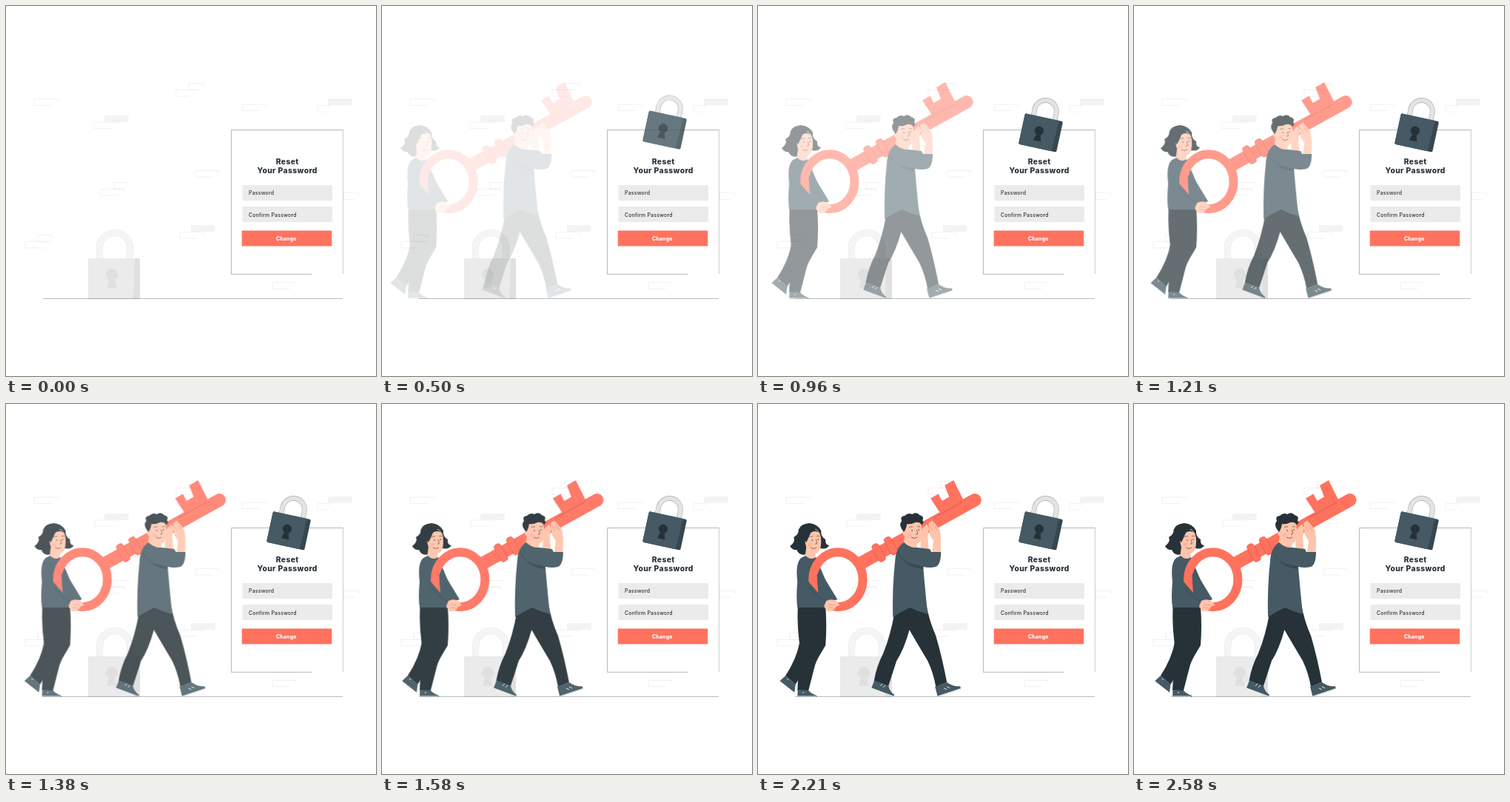
An HTML page for the animation above (2620 ms loop, 500 px wide and 500 px high).

```html
<!DOCTYPE html>
<html lang="en">
<head>
<meta charset="utf-8">
<title>Reset your password</title>
<style>
  html, body { margin: 0; width: 100%; height: 100%; overflow: hidden; background: #fff; }
  svg { display: block; width: 100vw; height: 100vh; }
  text { font-family: Inter, Roboto, sans-serif; fill: #263238; }
  .title { font-size: 10.3px; font-weight: 800; letter-spacing: .4px; text-anchor: middle; }
  .label { font-size: 6.9px; font-weight: 500; letter-spacing: .25px; }
  .button { font-size: 6.9px; font-weight: 800; letter-spacing: .2px; text-anchor: middle; fill: #fff; }
  .line { fill: none; stroke: #263238; stroke-width: .6; }
  .thin { fill: none; stroke: #263238; stroke-width: .35; }
  .white { fill: none; stroke: #fff; stroke-width: .9; }
  .skin { fill: #ffc4ab; }
  .dark { fill: #263238; }
  .cloth { fill: #455a64; }
  .shade { fill: #37474f; }
  .coral { fill: #ff725e; }
  .pale { fill: #ebebeb; }
  .grey { fill: #e0e0e0; }
</style>
</head>
<body>
<svg viewBox="0 0 500 500">
  <g id="bricks" fill="none" stroke="#e0e0e0" stroke-width=".45"></g>

  <g id="floorLock" fill="none">
    <path d="M126.5 342V327a20.5 20.5 0 0 1 41 0v15" stroke="#e6e6e6" stroke-width="9"/>
    <path d="M126.5 342V327a20.5 20.5 0 0 1 41 0v15" stroke="#f5f5f5" stroke-width="8"/>
    <rect class="grey" x="111" y="341" width="70" height="55" rx="2"/>
    <path class="pale" d="M113 341H174L172 396H113q-2 0-2-2V343q0-2 2-2z"/>
    <circle class="grey" cx="143" cy="363" r="8"/>
    <path class="grey" d="M140 368h6l4 13h-14z"/>
  </g>
  <path class="thin" d="M50 395.4H455"/>

  <g id="form">
    <path fill="#fff" d="M304.5 167.5h151v195h-151z"/>
    <path class="thin" d="M413 362.4H304.5V167.5h151"/>
    <path class="thin" d="M455.5 167.5V362" opacity=".7"/>
    <text class="title" x="380.2" y="214.2">Reset</text>
    <text class="title" x="380.2" y="226.2">Your Password</text>
    <path class="pale" d="M319.5 242H441v21H319.5zM319.5 271H441v21H319.5z"/>
    <rect class="coral" x="318.7" y="303.5" width="121.6" height="21" rx=".5"/>
    <text class="label" x="328" y="254.5">Password</text>
    <text class="label" x="328" y="284.5">Confirm Password</text>
    <text class="button" x="378.800" y="316.500">Change</text>
  </g>

  <g id="lock">
    <g transform="translate(361 145) rotate(12.2)">
      <path d="M11.500 2V-8.500a14.800 14.800 0 0 1 29.600 0V2" fill="none" stroke="#8b9499" stroke-width="6.600"/>
      <path d="M11.500 2V-8.500a14.800 14.800 0 0 1 29.600 0V2" fill="none" stroke="#e3e3e3" stroke-width="5.800"/>
      <rect class="shade" width="52.300" height="42.500" rx="2"/>
      <path class="cloth" d="M2 0H47L45.500 42.500H2q-2 0-2-2V2q0-2 2-2z"/>
      <circle class="dark" cx="23.500" cy="19.200" r="6.200"/>
      <path class="dark" d="M21 23h5l3 10H18.500z"/>
    </g>
  </g>

  <g id="people">
    <g id="woman">
      <path class="dark" d="M68 161Q56 162 53.500 170Q54 176 47 180Q50 186 42 192Q45 198 51 197Q55 206 64 203
        L84 195Q91 197 95 191Q89 190 90 183Q83 179 84 171Q79 162 68 161z"/>
      <path class="dark" d="M55 322Q51 344 36 367L49.500 379Q59 364 66 342z"/>
      <path class="dark" d="M52.500 272L90 274Q92 300 90 326C84 337 78 345 75.500 354L67 387H52Q53 360 57 338Q51 305 52.500 272z"/>
      <path class="cloth" d="M36 367L49.500 378.500L48 390L28 374.500z"/>
      <path class="cloth" d="M52.500 386L67 387Q70 391 78 394V395.700H52z"/>
      <path class="white" d="M28 374.500L47.500 390M52 395H77M38 372h2M59 390h2"/>
      <path class="skin" d="M64 193L77 198L76 210Q68 214 62 208z"/>
      <path class="cloth" d="M63 205Q70 212 77 207L90 238L88 275H52Q50 262 52 240Q49 215 57 208z"/>
      <path class="skin" d="M62 184Q66 171 77 169Q84 173 84 185C84 195 82 202 75 202Q65 201 63 190z"/>
      <path class="dark" d="M83 174Q75 170 70 174Q67 181 64 187Q58 182 63 172Q71 164 83 174z"/>
      <g class="line">
        <path d="M68 180q2-2 5-1M78 179q2-2 4 0M77 183q2 4 1 6h-2M70 194q4 3 8 0"/>
      </g>
      <circle class="dark" cx="72" cy="184" r=".8"/>
      <circle class="dark" cx="80" cy="183" r=".8"/>
      <circle cx="69" cy="190" r="2.600" fill="#ff9a89" opacity=".4"/>
    </g>

    <g id="key">
      <ellipse cx="106.700" cy="237.200" rx="33.700" ry="37" fill="none" stroke="#ff725e" stroke-width="12"/>
      <g transform="translate(136.500 215) rotate(-29)">
        <path class="coral" d="M-1-8H178a8.800 8.800 0 0 1 0 17.500H-1z"/>
        <g class="coral" stroke="#c9493a" stroke-width=".4">
          <rect x="24" y="-13" width="10" height="26" rx="4"/>
          <rect x="43" y="-13" width="10" height="26" rx="4"/>
        </g>
      </g>
      <path class="coral" d="M232 127.500L242.500 121.500L247.500 131L257 125.500L251 110L263 103L277 131L246 149z"/>
      <path d="M236 154L275 132.500" stroke="#a9483c" stroke-width=".5"/>
    </g>

    <g id="womanArm">
      <path class="cloth" d="M57 232L67 240L80 255Q79 243 78.500 231L82 224L92 241L106 264L92 269L88 275H56z"/>
      <path d="M66 246Q76 258 90 268" class="line" opacity=".6"/>
      <path class="skin" d="M91 266Q99 262 106 267L109 272L104 274Q101 281 92 280L88 273z"/>
      <path d="M95 271l8 1M94 275l7 1" stroke="#e58b78" stroke-width=".6"/>
    </g>

    <g id="man">
      <path class="dark" d="M183 270H207L204 303Q196 332 186 347L175 381L155.500 374Q159 354 168 337Q178 312 183 283z"/>
      <path class="dark" d="M194 270H226Q230 293 239 313Q247 340 254 376L239 382Q236 364 228 347Q216 327 202 303z"/>
      <path class="line" d="M204 305Q208 297 208 289" stroke="#56666e"/>
      <path class="cloth" d="M156 373.500L175 380.500Q176 388 183 393L182 395.500L152 384z"/>
      <path class="cloth" d="M238 382L254 376Q262 382 272 381.500L273 385L241.500 395.500z"/>
      <path class="white" d="M152 384L182 395M241.500 395L273 384.500M164 381l3-3M168 383l3-3M250 384l4 2M254 382l4 2"/>
      <path class="skin" d="M218 197L219 180Q218 172 222 167L227 162L230 168L228 178L229.500 198z"/>
      <path class="skin" d="M197 178L214 184L213 198Q202 199 195 190z"/>
      <path class="cloth" d="M196 187Q204 195 214 194L231 196L233 200L246 200C246 210 244 218 239 220
        Q231 222 222 220Q224 245 228 284Q216 281 204 275Q193 280 181 288Q180 248 184 212Q185 194 196 187z"/>
      <path class="shade" d="M197 214Q210 219 222 219.500L222 223Q206 221 197 214z"/>
      <path class="line" d="M188 201Q195 216 218 219" opacity=".6"/>
      <path class="skin" d="M234 200L236 185L231 177L229 161L234 157.500L239 163L244 169Q247 178 245.500 200z"/>
      <path d="M234 160l4 9M231 164l4 8M238 164l3 7" stroke="#e58b78" stroke-width=".6" fill="none"/>
      <path class="skin" d="M196 168Q199 157 211 157Q221 159 220.500 175C221 184 217 189 211 189Q202 188 198 180Q193 177 194 170z"/>
      <path class="dark" d="M196 173L193 169Q189 163 193 158Q190 152 197 151Q202 146 207 149
        Q213 145 217 150Q224 152 221 157Q224 161 220 163Q217 159 211 160Q206 163 200 162Q199 169 196 173z"/>
      <g class="line">
        <path d="M203 167q2-2 5-1M214 166q2-1 4 0M213 170q2 4 1 6h-2M206 180q4 3 8 0"/>
      </g>
      <circle class="dark" cx="207" cy="171" r=".8"/>
      <circle class="dark" cx="216" cy="170" r=".8"/>
      <circle cx="204" cy="177" r="2.600" fill="#ff9a89" opacity=".4"/>
    </g>
  </g>
</svg>
<script>
const LOOP = 2620, START = 130, LEAD = 40, SHIFT = 20;
const byId = id => document.getElementById(id);

// Open outlines: left edge, top, and part of the bottom.
const outlines = [[38, 126, 32], [119, 157, 32], [247, 104.5, 20], [230, 113.5, 24],
  [319, 133, 32], [421, 134.5, 16], [256, 222.5, 32], [146, 238.5, 19], [128, 247.5, 32],
  [235, 305.5, 32], [43, 309.5, 19], [26, 318.5, 34], [360, 373.5, 32], [456, 252.5, 21]];
const solids = [[133, 148], [435, 125], [250, 296]];
byId('bricks').innerHTML =
  outlines.map(([x, y, w]) => `<path d="M${x + w * .75} ${y + 8.5}H${x}V${y}h${w}v4"/>`).join('') +
  solids.map(([x, y]) => `<path fill="#f3f3f3" stroke="none" d="M${x} ${y}h32.500v9h-32.500z"/>`).join('');

function bezier(a, b, s) {
  return 3 * (1 - s) ** 2 * s * a + 3 * (1 - s) * s * s * b + s ** 3;
}

// cubic-bezier(.36, -.01, .5, 1.38): ends with a small overshoot.
function ease(x) {
  if (x >= 1) return 1;
  let low = 0, high = 1;
  for (let i = 0; i < 24; i++) {
    const mid = (low + high) / 2;
    if (bezier(.36, .5, mid) < x) low = mid; else high = mid;
  }
  return bezier(-.01, 1.38, low);
}

function slideIn(id, t, duration, dx, dy) {
  const k = t < START ? 0 : ease((t + LEAD) / duration);
  const el = byId(id);
  el.setAttribute('opacity', Math.min(1, Math.max(0, k)));
  el.setAttribute('transform', `translate(${dx * (1 - k)} ${dy * (1 - k)})`);
}

function draw() {
  const t = performance.now() % LOOP;
  slideIn('people', t, 2600, -SHIFT, 0);
  slideIn('lock', t, 1000, 0, -SHIFT);
  requestAnimationFrame(draw);
}
draw();
</script>
</body>
</html>
```
